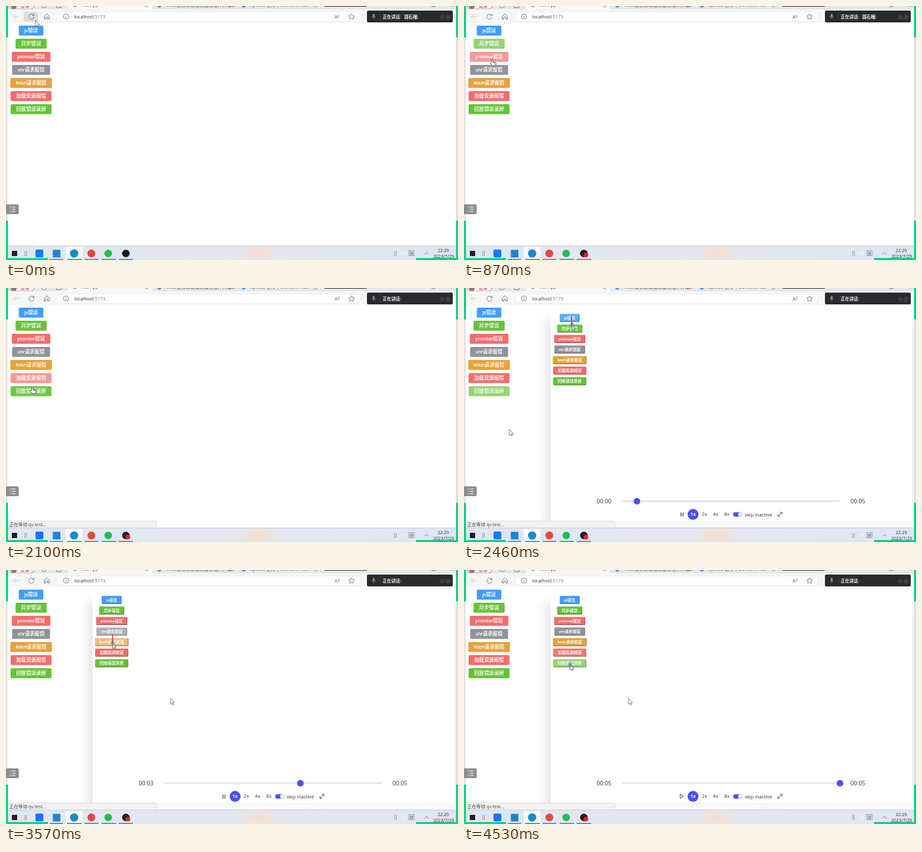
An HTML page for the animation above (4.59 s loop, 690 by 388 pixels).

```html
<!DOCTYPE html>
<html lang="zh-CN">
<head>
<meta charset="utf-8">
<style>
html, body { margin: 0; width: 100%; height: 100%; overflow: hidden; background: #fff; }
svg { display: block; width: 690px; height: 388px; }
text { font-family: "Open Sans", "Noto Sans CJK SC", "Noto Sans CJK", sans-serif; }
.btn text { font: 500 7.6px "Liberation Sans", "Noto Sans CJK SC", "Noto Sans CJK", sans-serif; fill: #fff; stroke: #fff; stroke-width: .22; text-anchor: middle; }
.line { fill: none; stroke: #6a6a6a; stroke-width: .8; }
.mid { text-anchor: middle; }
</style>
</head>
<body>
<svg viewBox="0 0 690 388" xmlns="http://www.w3.org/2000/svg">
  <defs>
    <clipPath id="page"><rect x="3" y="26" width="684" height="340"/></clipPath>
    <filter id="soft" x="-20%" y="-20%" width="140%" height="140%"><feGaussianBlur stdDeviation="8"/></filter>
    <radialGradient id="glow"><stop offset="0" stop-color="#f8dccb"/><stop offset="1" stop-color="#f8dccb" stop-opacity="0"/></radialGradient>
    <linearGradient id="bar"><stop offset="0" stop-color="#dfe6f1"/><stop offset=".5" stop-color="#e5e7f0"/><stop offset="1" stop-color="#dfe6f2"/></linearGradient>
    <path id="arrow" d="M0 0V9.2L2.2 7.2L3.6 10.2L5 9.5L3.7 6.7L6.4 6.5Z" stroke-linejoin="round"/>
  </defs>
  <rect width="690" height="388" fill="#fff"/>

  <!-- tab strip -->
  <rect width="690" height="6" fill="#e6e7e9"/>
  <rect x="5" y="-8" width="38" height="13" rx="6" fill="#f7eeee" stroke="#c26a6a" stroke-width=".8"/>
  <circle cx="12" cy="0" r="4.5" fill="#8f7474"/>
  <text x="22" y="1.8" font-size="7" fill="#a33">登录</text>
  <path class="line" d="M54 -2A4 4 0 0 0 62 -1M77 -3V2.5H84V-3"/>
  <path d="M95 6V-1H223V6Z" fill="#f8f8f8"/>
  <circle cx="105" cy="-1" r="2.5" fill="#41b883"/>
  <circle cx="234" cy="-.5" r="3" fill="#4a90f0"/>
  <circle cx="363" cy="-.5" r="3" fill="#409eff"/>
  <g font-size="7" fill="#555">
    <text x="114" y="1.2">Vite App</text>
    <text x="244" y="1.2">Vue3整合前端错误监控插件开发...</text>
    <text x="372" y="1.2">Upload 上传 | Element Plus</text>
  </g>
  <path class="line" d="M212 -3L217 2M217 -3L212 2M341 -3L346 2M346 -3L341 2M470 -3L475 2M475 -3L470 2M650 -4V1H655V-4M679 -4L684 1M684 -4L679 1"/>
  <rect x="486" y="-2" width="65" height="3" rx="1" fill="#3c3c40"/>

  <!-- toolbar -->
  <rect y="5" width="690" height="21" fill="#f6f6f7"/>
  <rect x="78" y="9" width="463" height="14.5" rx="7" fill="#fff" stroke="#e3e3e5" stroke-width=".6"/>
  <rect id="hot" x="27" y="9" width="22" height="15" rx="2" fill="#dcdcde"/>
  <path class="line" d="M19.500 16H11M14.500 12.500L11 16L14.500 19.500" style="stroke:#c4c4c4"/>
  <path class="line" d="M42.200 14.200A4 4 0 1 0 42.800 17M42.800 11.800V14.600H40"/>
  <path class="line" d="M58.500 15.500L62.300 12L66.200 15.500V20H63.800V17H60.800V20H58.500Z"/>
  <circle class="line" cx="91.500" cy="16" r="4"/>
  <path class="line" d="M91.500 15.500V18.300M91.500 13.600V14.500"/>
  <text x="104" y="18.700" font-size="7.100" fill="#333">localhost<tspan fill="#777">:5173</tspan></text>
  <text x="501.500" y="19" font-size="7.500" fill="#666">A<tspan font-size="5" dy="-2.500">))</tspan></text>
  <path class="line" d="M527.500 11.800L528.900 14.700L532 15.100L529.800 17.200L530.300 20.300L527.500 18.800L524.700 20.300L525.200 17.200L523 15.100L526.100 14.700Z" stroke-linejoin="round"/>

  <!-- speaker bar -->
  <rect x="551" y="7" width="131" height="18" rx="2" fill="#29292e"/>
  <rect x="560" y="12" width="2.600" height="5" rx="1.300" fill="#999"/>
  <path d="M558.700 15.500A2.600 2.600 0 0 0 563.900 15.500M561.300 18V20" fill="none" stroke="#999" stroke-width=".7"/>
  <path d="M571 10V22" stroke="#45454a" stroke-width=".8"/>
  <text x="575" y="18.500" font-size="6.600" font-weight="600" fill="#f2f2f2">正在讲话: <tspan id="who" x="608">圆石榴;</tspan></text>
  <circle cx="666" cy="17" r="3.500" fill="#3d3d42"/><circle cx="675" cy="17" r="4" fill="#3d3d42"/>

  <g id="main"></g>

  <g clip-path="url(#page)">
    <g id="drawer">
      <rect x="124" y="50" width="560" height="335" fill="#000" opacity=".1" filter="url(#soft)"/>
      <rect x="132" y="26" width="552" height="340" fill="#fff"/>
      <g id="replay" transform="translate(161 46) scale(.805) translate(-38 -38)"></g>
      <path id="tail" fill="none" stroke="#e0243c" stroke-width="1.500" stroke-linejoin="round"/>
      <g id="ghost">
        <circle id="dot" r="3.300" fill="#4950f6" opacity=".4"/>
        <use href="#arrow" transform="scale(.95)" fill="#fff" fill-opacity=".35" stroke="#555" stroke-width=".8"/>
      </g>
      <g font-size="8.800" fill="#333"><text id="now" x="202.500" y="329.200"></text><text x="590" y="329.200">00:05</text></g>
      <rect x="240" y="324.300" width="334" height="2.600" rx="1" fill="#e4e5f6"/>
      <circle id="knob" cy="325.700" r="5" fill="#4950f6"/>
      <path id="pause" d="M331.300 343V349M334.300 343V349" stroke="#444" stroke-width="1.200"/>
      <path id="play" class="line" d="M330 342.800L335 345.800L330 348.800Z" style="stroke:#222"/>
      <circle cx="349.700" cy="345.800" r="8.300" fill="#4950f6"/>
      <g class="mid" font-size="7.300" fill="#333">
        <text x="349.700" y="348.400" fill="#fff" font-weight="700">1x</text>
        <text x="367" y="348.400">2x</text><text x="384" y="348.400">4x</text><text x="401.300" y="348.400">8x</text>
      </g>
      <rect x="411" y="342.500" width="14" height="6.800" rx="3.400" fill="#4950f6"/>
      <circle cx="421.700" cy="345.900" r="3.100" fill="#fff" stroke="#ccc" stroke-width=".4"/>
      <text x="428.500" y="348.500" font-size="7.350" fill="#333">skip inactive</text>
      <path class="line" d="M479.500 348.500L485 343M482.300 342.700H485.300V345.700M479.200 345.800V348.800H482.200" style="stroke:#333"/>
    </g>
    <rect id="scroll" x="3" y="355.500" width="684" height="11" fill="#f7f7f8"/>
  </g>

  <rect y="26" width="2.500" height="342" fill="#e2e2e4"/><rect x="687" y="26" width="3" height="342" fill="#dedee0"/>
  <g id="status">
    <path d="M0 356H228Q230 356 230 358V367H0Z" fill="#f2f2f3" stroke="#d2d2d4" stroke-width=".7"/>
    <text x="5" y="363.500" font-size="6.900" fill="#444">正在等待 qv.test...</text>
  </g>
  <path d="M0 303H17Q19.500 303 19.500 305.500V315.500Q19.500 318 17 318H0Z" fill="#8d8d8f"/>
  <path d="M5.500 307H7M8.500 307H14.500M7 310.500H8M9.500 310.500H14.500M5.500 314H7M8.500 314H14.500" stroke="#fff" stroke-width="1.200"/>

  <!-- taskbar -->
  <rect y="366" width="690" height="22" fill="url(#bar)"/>
  <rect y="366" width="690" height="1.200" fill="#d0d3da"/>
  <ellipse cx="385" cy="378" rx="34" ry="14" fill="url(#glow)"/>
  <rect x="91" y="368" width="26" height="20" fill="#f6f8fb"/>
  <rect x="9" y="374" width="8" height="8" fill="#1f1f22"/>
  <path d="M28.800 374V382M31.300 374V382M593.300 374V382M595.800 374V382" stroke="#888" stroke-width=".8"/>
  <rect x="45" y="372" width="12" height="12" rx="2" fill="#1677ff"/>
  <rect x="71.500" y="372.500" width="11.500" height="11.500" fill="#1f83cf"/>
  <circle cx="104" cy="378" r="6.300" fill="#168bcb"/>
  <circle cx="130.300" cy="378" r="6" fill="#e3483b"/>
  <circle cx="156" cy="378" r="5.800" fill="#20bd52"/>
  <circle cx="183" cy="378" r="5.800" fill="#1b1b1e"/>
  <circle id="badge" cx="186" cy="380.500" r="3.600" fill="#e8222b"/>
  <path d="M67 387.200H87M93 387.200H116M120 387.200H141M146 387.200H168M172 387.200H194" stroke="#2b88d8" stroke-width="1.600"/>
  <g class="mid" font-size="6.700" fill="#333">
    <text x="606.500" y="380" font-size="5.500" fill="#fff">CH</text>
    <text x="619" y="379.800" font-size="6" fill="#555">拼</text>
    <text x="667.500" y="375.500">22:29</text><text x="668" y="384.800">2023/7/29</text>
  </g>
  <rect class="line" x="615" y="373.500" width="8" height="8" style="stroke-width:.5"/>
  <path class="line" d="M638.500 379.500L641.700 376.300L645 379.500"/>

  <path d="M1.500 0V48M688.500 0V48M1.500 328V386.500H64M688.500 328V386.500H626" fill="none" stroke="#0bd083" stroke-width="3"/>

  <use id="pointer" href="#arrow" fill="#fff" stroke="#555" stroke-width=".7"/>
  <g id="hand" fill="#fff" stroke="#333" stroke-width=".7" stroke-linejoin="round">
    <path d="M-1 5.500V.8Q0 -.6 1 .8V4.200L5 5Q6 5.300 5.800 6.500L5 10.500H.2L-3.200 6.800Q-3 5.400 -1.800 6.100Z"/>
    <path d="M2.400 4.600V6.400M4 4.900V6.500" fill="none" stroke-width=".6"/>
  </g>
</svg>
<script>
const $ = id => document.getElementById(id);
// the recording starts at REC, its playback at PLAY
const LOOP = 4590, REC = 255, PLAY = 2316, LENGTH = 2000;
const BLUE = [64, 158, 255], GREEN = [103, 194, 58], RED = [245, 108, 108], GRAY = [144, 147, 153], AMBER = [230, 162, 60];

// label, width, colour, click time
const buttons = [
  ['js错误', 37.5, BLUE, 230],
  ['异步错误', 47.5, GREEN, 570],
  ['promise错误', 59, RED, 980],
  ['xhr请求报错', 58, GRAY, 1350],
  ['fetch请求报错', 63.5, AMBER, 1625],
  ['加载资源报错', 62.5, RED, 1980],
  ['回放错误录屏', 62.5, GREEN, 2230]
];

// time, x, y of the pointer
const path = [
  [30, 45, 22], [190, 42, 36], [340, 42, 36], [440, 43, 59], [640, 43, 59], [800, 43, 80],
  [870, 43, 81], [1090, 43, 82], [1170, 41, 103], [1410, 40, 104], [1500, 40, 119],
  [1690, 42, 118], [1810, 42, 139], [2040, 42, 139], [2150, 39, 160], [2320, 39, 160],
  [2460, 69, 216], [2720, 251, 196]
];

const clamp = (v, a = 0, b = 1) => Math.min(b, Math.max(a, v));
const ease = k => k * k * (3 - 2 * k);
const show = (id, on) => $(id).setAttribute('visibility', on ? 'visible' : 'hidden');
const move = (id, x, y) => $(id).setAttribute('transform', `translate(${x.toFixed(2)} ${y.toFixed(2)})`);

function pos(t) {
  const i = path.findIndex(p => p[0] > t);
  if (i === 0) return path[0].slice(1);
  if (i < 0) return path[path.length - 1].slice(1);
  const [a, b] = [path[i - 1], path[i]], k = ease((t - a[0]) / (b[0] - a[0]));
  return [a[1] + (b[1] - a[1]) * k, a[2] + (b[2] - a[2]) * k];
}

function hovered(t) {
  const [x, y] = pos(t);
  return buttons.findIndex((b, i) => Math.abs(x - 38) < b[1] / 2 && Math.abs(y - 37.5 - 20 * i) < 7.7);
}

// the last button clicked since the given time keeps the focus
function focused(t, since) {
  return t > 2510 ? -1 : buttons.findLastIndex(b => b[3] >= since && b[3] <= t);
}

function shade(i, t, live) {
  const [, , rgb, click] = buttons[i];
  if (live && t >= click && t < click + 50) return rgb.map(v => v * .8);
  const lit = hovered(t) === i || focused(t, live ? 0 : REC) === i;
  return lit ? rgb.map(v => v + (255 - v) * .3) : rgb;
}

// averaging recent states gives the short colour transition
function fill(i, t, live) {
  const s = [0, 10, 20, 30].map(d => shade(i, t - d, live));
  return `rgb(${[0, 1, 2].map(c => Math.round(s.reduce((n, v) => n + v[c], 0) / 4))})`;
}

function build(id, bevel) {
  $(id).innerHTML = buttons.map(([label, w], i) => {
    const x = 38.3 - w / 2, y = 30 + 20 * i, r = x + w - .4;
    const edge = bevel ? `<path d="M${x + 1} ${y + 14.7}H${r}V${y + 1}" fill="none" stroke="#222" stroke-opacity=".5" stroke-width="1"/>` : '';
    return `<g class="btn"><rect x="${x}" y="${y}" width="${w}" height="15.200" rx="1.700"/>${edge}<text x="38.300" y="${y + 10.3}">${label}</text></g>`;
  }).join('');
  return [...$(id).querySelectorAll('rect')];
}

const mainRects = build('main', false), replayRects = build('replay', true);
const paint = (rects, t, live) => rects.forEach((r, i) => r.setAttribute('fill', fill(i, t, live)));
const toReplay = ([x, y]) => [161 + (x - 38) * .805, 46 + (y - 38) * .805];

function drawReplay(t) {
  const k = clamp((t - PLAY) / LENGTH), rec = REC + k * LENGTH;
  paint(replayRects, rec, false);
  const [x, y] = toReplay(pos(rec));
  move('ghost', x, y);
  const near = buttons.some(b => rec >= b[3] && rec < b[3] + 80 && k < 1);
  $('dot').setAttribute('r', near ? 2.2 : 3.3);
  const trail = [];
  for (let d = 130; d >= 0; d -= 10) trail.push(toReplay(pos(Math.max(REC, rec - d))).map(v => v.toFixed(2)).join(' '));
  $('tail').setAttribute('d', 'M' + trail.join('L'));
  show('tail', k < 1);
  $('knob').setAttribute('cx', 240 + 334 * k);
  $('now').textContent = '00:0' + Math.floor(5.02 * k);
  show('pause', k < 1);
  show('play', k === 1);
}

function draw(t) {
  const [x, y] = pos(t), over = hovered(t) >= 0;
  paint(mainRects, t, true);
  show('hot', y < 25);
  show('who', t < 1380);
  show('badge', t >= 300);
  show('status', t >= 2010);
  move('pointer', x, y);
  move('hand', x, y);
  show('pointer', !over);
  show('hand', over);
  const open = t >= 2250;
  show('scroll', open);
  $('drawer').style.display = open ? '' : 'none';
  if (open) {
    move('drawer', 590 * (1 - ease(clamp((t - 2250) / 120))), 0);
    drawReplay(t);
  }
}

function tick() {
  draw(Math.floor((performance.now() % LOOP) / 30) * 30);
  requestAnimationFrame(tick);
}
tick();
</script>
</body>
</html>
```
